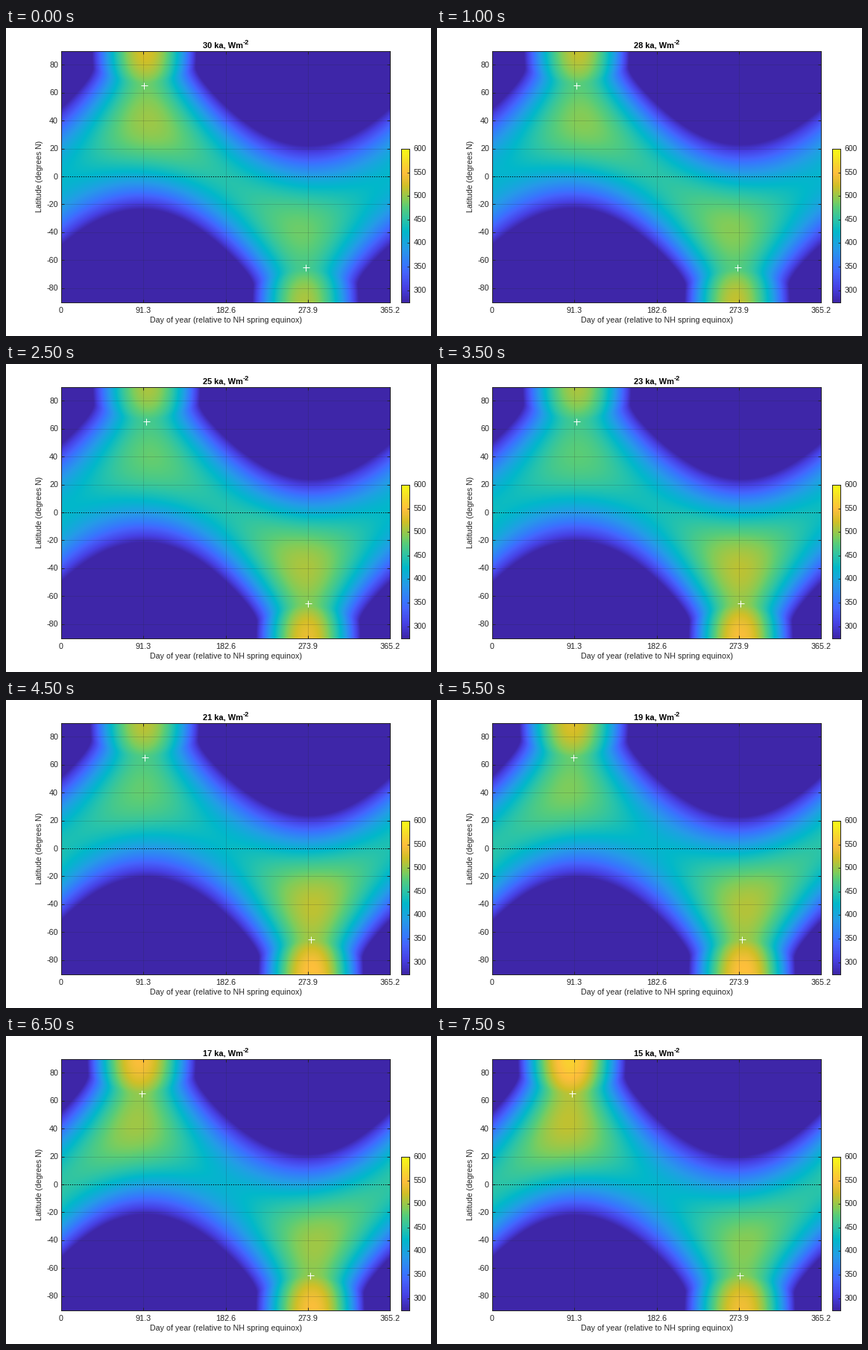
These frames come from a looping animation (570 px wide and 413 px high, 8000 ms). A matplotlib script:

```python
import numpy as np
import matplotlib.pyplot as plt
from matplotlib.animation import FuncAnimation
from matplotlib.colors import LinearSegmentedColormap

W, H, DPI = 570, 413, 100
PX = 72 / DPI
YEAR = 365.2422
S0 = 1365
INK = (0.15, 0.15, 0.15)
VMIN, VMAX = 275, 600

plt.rcParams["font.family"] = "Liberation Sans"

# Key colours of parula, by position out of 63
PARULA = {0: "#3E26A8", 6: "#4741E5", 12: "#4563FD", 15: "#3875FE",
          22: "#259BE8", 29: "#01B8CA", 34: "#2CC4A7", 39: "#57CC7A",
          42: "#81CC59", 48: "#D1BF27", 53: "#FEBE3C", 58: "#F7DC2A",
          63: "#F9FB15"}
cmap = LinearSegmentedColormap.from_list(
    "parula", [(i / 63, c) for i, c in PARULA.items()])


def orbit(ka):
    """Eccentricity, obliquity and solar longitude of perihelion,
    in simple fits that hold from 30 to 15 ka."""
    e = 0.01968 - 1.18e-5 * (ka - 13.4)**2
    obl = 23.23 + 1.01 * np.cos(np.radians(9.13 * (ka - 9.4)))
    peri = 392.9 - 16.4 * (ka - 15)
    return e, np.radians(obl), np.radians(peri)


def mean_anomaly(nu, e):
    ecc = 2 * np.arctan(np.sqrt((1 - e) / (1 + e)) * np.tan(nu / 2))
    return ecc - e * np.sin(ecc)


def solstices(ka):
    """Days from the northern spring equinox to both solstices."""
    e, _, peri = orbit(ka)
    angles = np.radians([90, 270])
    turn = mean_anomaly(angles - peri, e) - mean_anomaly(-peri, e)
    return turn % (2 * np.pi) * YEAR / (2 * np.pi)


def insolation(ka, day, lat):
    """Daily mean insolation; days count from the northern spring equinox."""
    e, obl, peri = orbit(ka)
    mean = mean_anomaly(-peri, e) + 2 * np.pi * day / YEAR
    ecc = mean
    for _ in range(6):
        ecc = ecc - (ecc - e * np.sin(ecc) - mean) / (1 - e * np.cos(ecc))
    lon = 2 * np.arctan(np.sqrt((1 + e) / (1 - e)) * np.tan(ecc / 2)) + peri
    dist = 1 - e * np.cos(ecc)
    dec = np.arcsin(np.sin(obl) * np.sin(lon))
    phi = np.radians(lat)
    h = np.arccos(np.clip(-np.tan(phi) * np.tan(dec), -1, 1))
    return S0 / np.pi / dist**2 * (
        h * np.sin(phi) * np.sin(dec) + np.cos(phi) * np.cos(dec) * np.sin(h))


fig = plt.figure(figsize=(W / DPI, H / DPI), dpi=DPI, facecolor="white")


def box(left, top, right, bottom):
    ax = fig.add_axes([left / W, 1 - bottom / H,
                       (right - left) / W, (bottom - top) / H])
    for s in ax.spines.values():
        s.set(color=INK, linewidth=PX)
    return ax


def label(x, y, s, size=10.7, color=INK, **kw):
    return fig.text(x / W, 1 - y / H, s, size=size * PX, color=color,
                    va="baseline", **kw)


L, T, R, B = 74, 30.52, 515.4, 367.56
days = np.linspace(0, YEAR, 442)
lats = np.linspace(-90, 90, 337)[:, None]

ax = box(L, T, R, B)
img = ax.imshow(insolation(30, days, lats), origin="lower", aspect="auto",
                extent=(0, YEAR, -90, 90), cmap=cmap, vmin=VMIN, vmax=VMAX,
                interpolation="bilinear")
xticks = np.arange(5) * YEAR / 4
yticks = np.arange(-80, 81, 20)
ax.set_xticks(xticks, [""] * 5)
ax.set_yticks(yticks, [""] * 9)
ax.tick_params(direction="in", length=4.4 * PX, width=PX, color=INK,
               top=True, right=True)
ax.set_axisbelow(False)
ax.grid(color=INK, alpha=0.17, linewidth=PX)
ax.axhline(0, color="black", linewidth=PX, linestyle=(0.5, (1, 2)), zorder=3)
marks, = ax.plot([], [], "+", color="white", markersize=9 * PX,
                 markeredgewidth=PX, zorder=4)

for x in xticks:
    label(L + x / YEAR * (R - L), 382.5, f"{x:.1f}" if x else "0", ha="center")
for y in yticks:
    label(70, (T + B) / 2 - y / 180 * (B - T) + 3.5, str(y), ha="right")
label(295, 395, "Day of year (relative to NH spring equinox)", 10.6,
      ha="center")
label(47.5, 199, "Latitude (degrees N)", 10.5, ha="center", rotation=90,
      rotation_mode="anchor")
title = label(264, 26, "", 11, "black", weight="bold")
label(317.5, 21.5, "-2", 9.2, "black", weight="bold")

BAR_TOP = 162
bar = box(530, BAR_TOP, 541.4, B)
bar.imshow(np.linspace(0, 1, 256)[:, None], origin="lower", aspect="auto",
           extent=(0, 1, VMIN, VMAX), cmap=cmap)
levels = np.arange(300, 601, 50)
bar.set_xticks([])
bar.set_yticks(levels, [""] * 7)
bar.tick_params(direction="in", length=3 * PX, width=PX, color=INK,
                left=False, right=True)
for v in levels:
    label(546.5, B - (v - VMIN) / (VMAX - VMIN) * (B - BAR_TOP) + 3, str(v),
          size=10.4)


def update(i):
    ka = 30 - i
    img.set_data(insolation(ka, days, lats))
    marks.set_data(solstices(ka), [65, -65])
    title.set_text(f"{ka} ka, Wm")
    return img, marks, title


anim = FuncAnimation(fig, update, frames=16, interval=500, repeat=True,
                     repeat_delay=0, blit=False)
plt.show()
```
